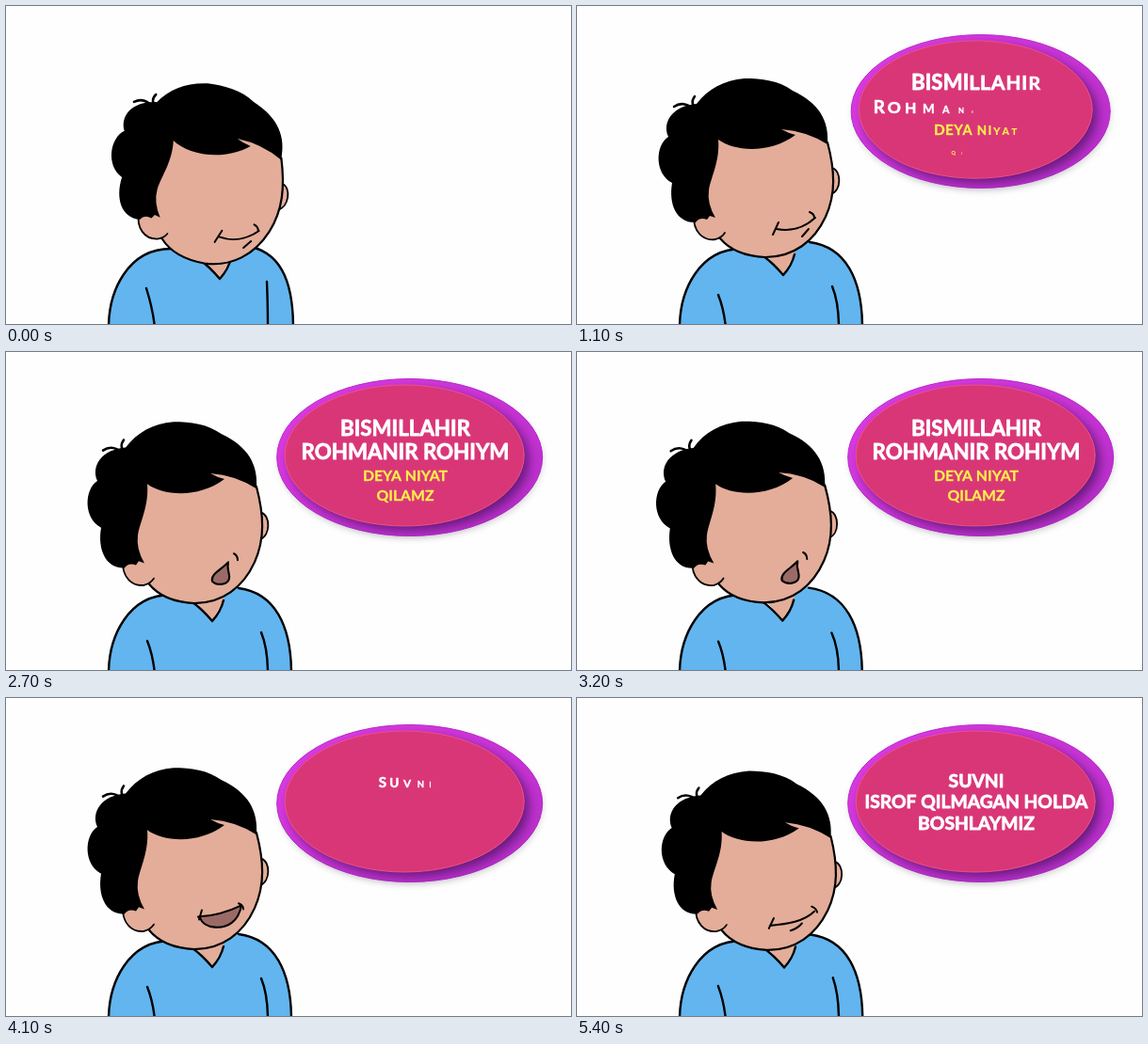
An HTML page with a canvas that plays this animation: 600x338 px, repeating every 7.4 s.

```html
<!DOCTYPE html>
<html lang="uz">
<head>
<meta charset="utf-8">
<style>
html, body { margin: 0; width: 100%; height: 100%; overflow: hidden; background: #fefefe; }
canvas { display: block; width: 100%; height: 100%; }
</style>
</head>
<body>
<canvas id="stage" width="600" height="338"></canvas>
<script>
const ctx = document.getElementById('stage').getContext('2d');
const LOOP = 7400, STEP = 100, LAST = 5400;
const SKIN = '#e3ad99', SHIRT = '#63b5ef', INK = '#000', MOUTH = '#9a6b66';
const path = d => new Path2D(d);

const head = {
  rightEar: path('M271 172 C281 175 281 196 270 200'),
  leftEar: path('M124 222 C123 240 134 250 147 248 Q154 246 157 241'),
  face: path('M266 142 C274 175 275 200 264 224 C252 250 230 267 200 267 C178 266 162 259 152 247 L126 226 L120 180 L148 130 L240 120 Z'),
  jaw: path('M266 145 C274 175 275 200 264 224 C252 250 230 267 200 267 C178 266 162 259 152 247'),
  hair: path('M266 147 C268 122 257 103 229 90 C214 79 196 77 178 77 C156 79 139 88 127 104 C102 106 90 123 97 139 C83 148 82 178 101 188 C97 211 106 231 126 230 Q130 224 138 227 L141 223 L147 225 Q138 210 140 196 C142 182 152 165 150 142 C166 154 204 158 232 137 Q224 135 217 131 Q244 133 266 147 Z'),
  tuft: path('M103 107 Q113 100 124 110 M125 96 Q119 104 128 110')
};

// open: filled shape, lines: strokes, lift: vertical stretch of the head
const smileTick = 'M247 219 Q252 221 252 225';
const mouths = {
  s: { lines: path('M208 243 L214 230 M212 237 C226 240 241 236 253 225 M239 245 L246 237 ' + smileTick), lift: 0 },
  p: { lines: path('M211 242 L217 236 M212 241 C228 235 243 237 253 226 M239 239 Q244 238 247 234 M244 220 Q247 225 253 226'), lift: .005 },
  o: { open: path('M236 224 C230 231 217 236 219 244 C224 249 236 248 237 241 C238 235 234 233 236 224 Z'), lines: path('M242 215 Q246 217 246 222'), lift: .015 },
  f: { lines: path('M215 245 C223 233 243 239 254 225 M236 241 Q244 239 247 235 M241 221 Q245 226 253 226'), lift: 0 },
  l: { open: path('M204 233 Q227 232 250 221 C247 238 235 245 222 244 Q209 243 206 234 Z'), lines: path('M208 226 L205 236 ' + smileTick), lift: .015 },
  e: { lines: path('M202 244 L207 233 M203 241 C222 239 239 236 250 225 M225 246 Q232 244 237 238 M247 220 Q252 222 253 226'), lift: 0 }
};
const speech = 'ssssssssssss' + 'ppoollpp' + 'olloffpo' + 'olplofpolf' + 'fpol' + 'llopfollopee' + 'e';

// [seconds, tilt]
const tiltKeys = [[.1, 1], [.6, -.12], [1.1, 0], [1.5, -.12], [1.9, 0], [2.3, -.08], [2.7, 0],
  [3.1, -.12], [3.5, 0], [4.8, 0], [5.4, .13]];

// [text, baseline, size, colour, start, delay per letter]
const YELLOW = '#fdf04a';
const firstText = [
  ['BISMILLAHIR', 89, 22.3, '#fff', 550, 25],
  ['ROHMANIR ROHIYM', 113.5, 22.3, '#fff', 820, 40],
  ['DEYA NIYAT', 136.5, 15.8, YELLOW, 670, 30],
  ['QILAMZ', 157.5, 15.8, YELLOW, 1020, 40]
];
const secondText = [
  ['SUVNI', 95, 19.3, '#fff', 3860, 40],
  ['ISROF QILMAGAN HOLDA', 117, 19.3, '#fff', 4150, 30],
  ['BOSHLAYMIZ', 139.5, 19.3, '#fff', 4300, 35]
];

function tiltAt(sec) {
  const n = tiltKeys.findIndex(k => k[0] > sec);
  if (n === 0) return tiltKeys[0][1];
  if (n < 0) return tiltKeys[tiltKeys.length - 1][1];
  const [t0, a] = tiltKeys[n - 1], [t1, b] = tiltKeys[n];
  return a + (b - a) * (1 - Math.cos(Math.PI * (sec - t0) / (t1 - t0))) / 2;
}

function shape(p, fill, line) {
  if (fill) { ctx.fillStyle = fill; ctx.fill(p); }
  if (line) { ctx.strokeStyle = INK; ctx.lineWidth = line; ctx.stroke(p); }
}

// The shoulders stay put while the collar follows the head.
function drawBody(tilt) {
  const at = (x, y) => `${x + 8 * tilt} ${y + 4 * tilt}`;
  const left = 'M109 342 C109 302 130 258 175 258';
  const collar = `${at(197, 265)} Q${at(209, 274)} ${at(219, 286)} Q${at(228, 276)} ${at(231, 264)}`;
  const right = `${at(247, 251)} C${285 + 5 * tilt} ${256 + 4 * tilt} ${303 + 2 * tilt} 290 ${303 + 2 * tilt} 342`;
  const arms = `M${150 - tilt} ${307 - 7 * tilt} Q156 322 158 342 M${271 + 6 * tilt} ${298 - 5 * tilt} Q278 315 278 342`;
  shape(path(`M${at(193, 255)} L${at(219, 286)} L${at(236, 254)} Z`), SKIN);
  shape(path(`${left} L${collar} L${at(234, 240)} L${right} Z`), SHIRT);
  shape(path(`${left} M${collar} M${right} ${arms}`), null, 2.4);
}

function drawHead(tilt, mouth) {
  ctx.save();
  ctx.translate(180 + 13 * tilt, 250 + 4 * tilt);
  ctx.rotate(.135 * tilt);
  ctx.translate(-180, -250);
  ctx.translate(0, 265);
  ctx.scale(1, 1 + mouth.lift);
  ctx.translate(0, -265);
  shape(head.rightEar, SKIN, 1.8);
  shape(head.face, SKIN);
  shape(head.leftEar, SKIN, 1.8);
  shape(head.jaw, null, 2.2);
  shape(head.hair, INK);
  shape(head.tuft, null, 2.5);
  if (mouth.open) shape(mouth.open, MOUTH, 2.1);
  shape(mouth.lines, null, 2);
  ctx.restore();
}

function ellipse(x, y, rx, ry, fill, shadow, blur, dx, dy) {
  ctx.save();
  ctx.beginPath();
  ctx.ellipse(x, y, rx, ry, 0, 0, 7);
  ctx.shadowColor = shadow;
  ctx.shadowBlur = blur;
  ctx.shadowOffsetX = dx;
  ctx.shadowOffsetY = dy;
  ctx.fillStyle = fill;
  ctx.fill();
  ctx.restore();
}

function rim(colour) {
  ctx.strokeStyle = colour;
  ctx.lineWidth = 1;
  ctx.stroke();
}

function drawBadge(sec) {
  if (sec < .4) return;
  const size = 1 - Math.exp(-5.15 * (sec - .38));
  ctx.save();
  ctx.translate(428.7, 112);
  ctx.scale(size, size);
  const violet = ctx.createLinearGradient(-60, -84, 60, 84);
  violet.addColorStop(0, '#db3ae2');
  violet.addColorStop(1, '#bd30cd');
  ellipse(0, 0, 141, 83.5, violet, 'rgba(0,0,0,.12)', 6, 1, 3);
  rim('#b52bcb');
  ellipse(-5.5, -2, 127, 75, '#d93678', 'rgba(60,15,85,.7)', 12, 5, 5);
  rim('#ee5284');
  ctx.restore();
}

function drawLine([text, y, size, colour, start, delay], ms) {
  ctx.font = `700 ${size}px Lato, sans-serif`;
  ctx.fillStyle = ctx.strokeStyle = colour;
  ctx.lineWidth = size > 18 ? .8 : .3;
  const left = 424 - ctx.measureText(text).width / 2;
  [...text].forEach((letter, i) => {
    const u = Math.min(1, (ms - start - i * delay) / 600);
    if (u <= 0 || letter === ' ') return;
    const grow = 1 - (1 - u) ** 3;
    const w = ctx.measureText(letter).width;
    const end = ctx.measureText(text.slice(0, i + 1)).width;
    ctx.save();
    ctx.translate(left + end - w / 2, y);
    ctx.scale(grow, grow);
    ctx.fillText(letter, -w / 2, 0);
    ctx.strokeText(letter, -w / 2, 0);
    ctx.restore();
  });
}

function draw(now) {
  const ms = Math.min(LAST, Math.floor(now % LOOP / STEP) * STEP);
  const tilt = tiltAt(ms / 1000);
  ctx.fillStyle = '#fefefe';
  ctx.fillRect(0, 0, 600, 338);
  ctx.lineCap = ctx.lineJoin = 'round';
  drawBody(tilt);
  drawHead(tilt, mouths[speech[ms / STEP]]);
  drawBadge(ms / 1000);
  for (const line of ms < 3800 ? firstText : secondText) drawLine(line, ms);
}

const begin = performance.now();
function tick() {
  draw(performance.now() - begin);
  requestAnimationFrame(tick);
}
tick();
</script>
</body>
</html>
```
